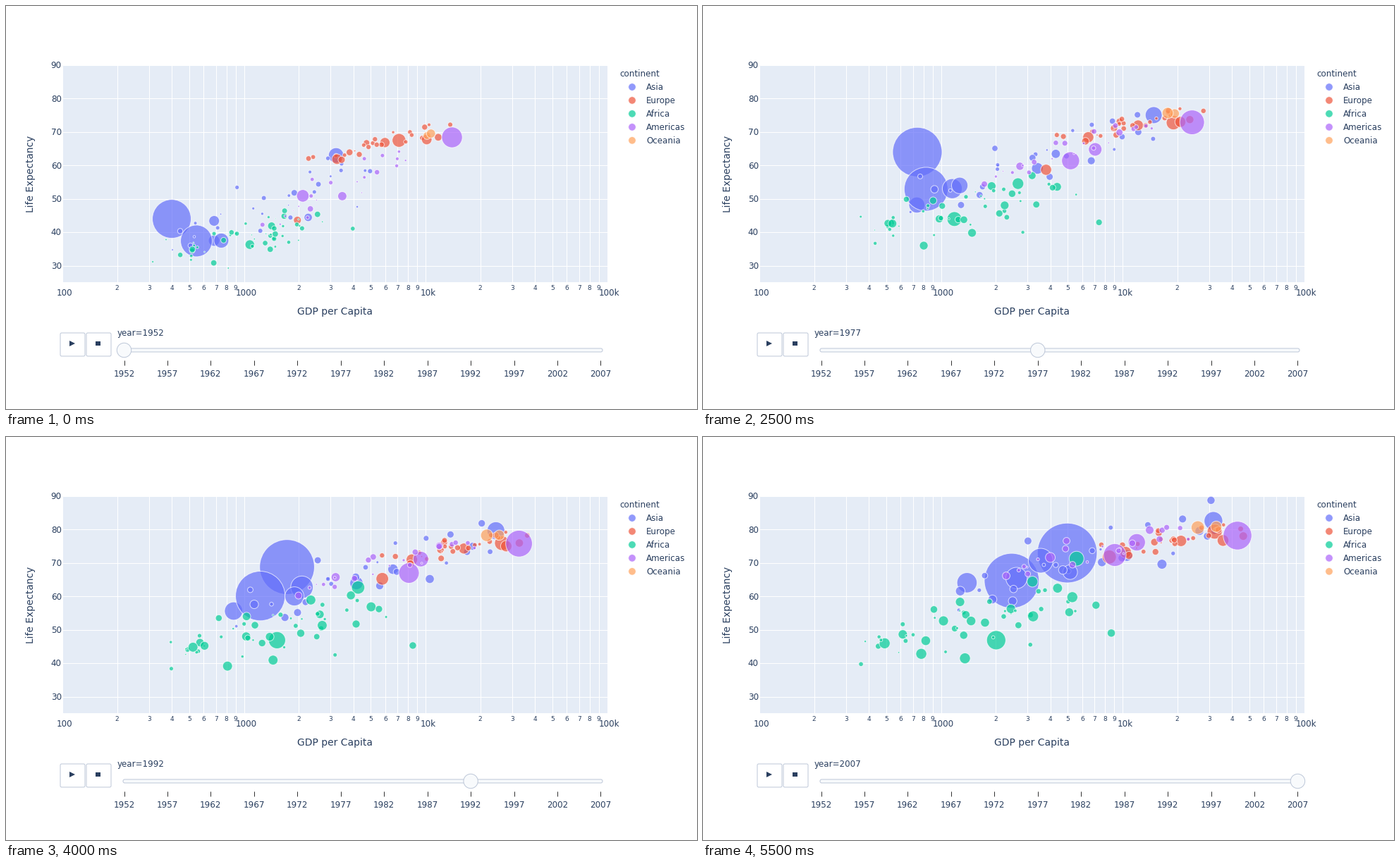
A matplotlib script that plays this animation: 980 by 572 pixels, repeating every 6000 ms.

```python
import numpy as np
import matplotlib.pyplot as plt
from matplotlib.animation import FuncAnimation
from matplotlib.patches import Circle, FancyBboxPatch, Polygon, Rectangle

W, H, DPI = 980, 572, 100
PT = 72 / DPI
STEPS = np.arange(12)
T = STEPS / 11
INK, BORDER, PALE = "#2a3f5f", "#bec8d9", "#f8fafc"
NAMES = ["Asia", "Europe", "Africa", "Americas", "Oceania"]
COLORS = ["#636efa", "#ef553b", "#00cc96", "#ab63fa", "#ffa15a"]
ASIA, EUROPE, AFRICA, AMERICAS, OCEANIA = range(5)
LEFT, RIGHT, TOP, BOTTOM = 80, 852.5, 84, 392

plt.rcParams["font.family"] = "DejaVu Sans"
rng = np.random.default_rng(11)
bubbles = []


def gdp_x(log_gdp):
    return LEFT + 257.5 * (log_gdp - 2)


def life_y(life):
    return TOP + 4.742 * (90 - life)


def add(group, log_gdp, life, pops):
    """Bubble area follows a population in millions that grows linearly."""
    radius = 1.166 * np.sqrt(pops[0] + (pops[1] - pops[0]) * T)
    bubbles.append((group, gdp_x(log_gdp), life_y(life), radius))


def giant(group, pops, *path, knots=(0, 3, 7, 11)):
    """Move a large bubble through a few (gdp, life) points."""
    gdp, life = zip(*path)
    add(group, np.interp(STEPS, knots, np.log10(gdp)), np.interp(STEPS, knots, life), pops)


def cloud(group, count, gdp0, gdp1, life0, life1, pop, growth, spread):
    """Scatter bubbles along a wealth-health trend that rises over the years.

    Ranges run from the poorest to the richest member, at the start and the end.
    """
    progress = T ** 0.75
    sway = np.sin(np.pi * T)
    for rank in (np.arange(count) + 0.5) / count:
        noise = rng.normal(0, spread, 6)
        g0, g1 = (np.interp(rank, (0, 1), np.log10(g)) for g in (gdp0, gdp1))
        l0, l1 = (np.interp(rank, (0, 1), life) for life in (life0, life1))
        log_gdp = g0 + noise[0] + (g1 - g0 + noise[1]) * progress + noise[2] / 2 * sway
        life = l0 + (l1 - l0) * progress + 20 * (noise[3] + noise[4] * T + noise[5] / 2 * sway)
        size = pop * np.exp(np.clip(rng.normal(), -2, 1.6))
        add(group, log_gdp, life, (size, size * growth))


giant(ASIA, (47, 150), (684, 37.5), (721, 43.5), (752, 52.8), (1391, 64.1))
giant(ASIA, (556, 1319), (400, 44), (488, 44.5), (613, 58.4), (741, 64), (2289, 70.4),
      (4959, 73), knots=(0, 2, 3, 5, 9, 11))
giant(ASIA, (372, 1110), (547, 37.4), (701, 47.2), (977, 58.6), (2452, 64.7))
giant(ASIA, (82, 224), (750, 37.5), (762, 46), (1748, 60.1), (3541, 70.7))
giant(ASIA, (86, 127), (3217, 63), (9848, 71.4), (22376, 78.7), (31656, 82.6))
giant(ASIA, (41, 169), (685, 43.4), (943, 49.8), (1705, 58.2), (2606, 65.5))
cloud(ASIA, 27, (480, 5500), (1150, 36000), (37, 61), (61, 81), 5, 3.2, 0.14)

giant(EUROPE, (69, 82), (7144, 67.5), (14746, 70.8), (24639, 74.8), (32170, 79.4))
giant(EUROPE, (22, 71), (1969, 43.6), (2826, 54.3), (5089, 63.1), (8458, 71.8))
cloud(EUROPE, 28, (2500, 11500), (9000, 38000), (61, 72), (74, 80.5), 8, 1.25, 0.05)

giant(AFRICA, (22, 80), (1419, 41.9), (1815, 49.3), (3885, 59.8), (5581, 71.3))
giant(AFRICA, (33, 135), (1077, 36.3), (1015, 41), (1385, 46.9), (2014, 46.9))
cloud(AFRICA, 50, (420, 2800), (430, 6500), (34, 44), (45, 60), 2.8, 3.1, 0.14)

giant(AMERICAS, (57, 190), (2109, 50.9), (3430, 57.6), (7807, 65.2), (9066, 72.4))
giant(AMERICAS, (30, 109), (3478, 50.8), (5755, 60.1), (8688, 69.5), (11978, 76.2))
giant(AMERICAS, (158, 301), (13990, 68.4), (19530, 70.8), (29884, 75), (42952, 78.2))
cloud(AMERICAS, 22, (1700, 7500), (3000, 20000), (42, 65), (67, 79), 3.5, 2.6, 0.08)

cloud(OCEANIA, 2, (10000, 10600), (36000, 23000), (69, 69.5), (81.5, 80), 6, 2.2, 0.005)

groups = [b[0] for b in bubbles]
xs, ys, rs = (np.array([b[i] for b in bubbles]) for i in (1, 2, 3))

fig = plt.figure(figsize=(W / DPI, H / DPI), dpi=DPI, facecolor="white")
ax = fig.add_axes([0, 0, 1, 1])
ax.set(xlim=(0, W), ylim=(H, 0))
ax.axis("off")


def label(x, y, text, size=11.85, ha="center"):
    """Place text with its capitals centred on y."""
    return ax.text(x, y + 0.365 * size, text, fontsize=size * PT, color=INK,
                   ha=ha, va="baseline")


def line(x, y, color, z):
    ax.plot(x, y, color=color, lw=PT, zorder=z, solid_capstyle="butt")


def rounded(x, y, w, h, radius, face):
    ax.add_patch(FancyBboxPatch((x, y), w, h, fc=face, ec=BORDER, lw=PT, zorder=3,
                                boxstyle=f"round,pad=0,rounding_size={radius}"))


def dots(x, y, r, colors):
    return ax.scatter(x, y, s=(2 * r * PT) ** 2, c=colors, alpha=0.7,
                      edgecolors="white", linewidths=PT, zorder=4)


plot_area = Rectangle((LEFT, TOP), RIGHT - LEFT, BOTTOM - TOP, fc="#e5ecf6", lw=0)
ax.add_patch(plot_area)

for power, text in zip(range(2, 6), ("100", "1000", "10k", "100k")):
    label(gdp_x(power) + 3.3, 407, text)
    for digit in range(1, 10 if power < 5 else 2):
        x = gdp_x(power + np.log10(digit))
        line([x, x], [TOP, BOTTOM], "white", 2)
        if digit > 1:
            label(x, 399.3, str(digit), 9)
for life in range(30, 91, 10):
    y = life_y(life)
    line([LEFT, RIGHT], [y, y], "white", 2)
    label(78.8, y, str(life), ha="right")
label(466.3, 433, "GDP per Capita", 13.9)
ax.text(35, 238.5, "Life Expectancy", fontsize=13.8 * PT, color=INK,
        rotation=90, ha="center", va="center")

label(870, 96, "continent", ha="left")
legend_y = 115 + 18.95 * np.arange(5)
dots(np.full(5, 888), legend_y, np.full(5, 5.3), COLORS)
for name, y in zip(NAMES, legend_y):
    label(908, y, name, ha="left")

rounded(77, 464, 35, 33, 2, "white")
rounded(114, 464, 35, 33, 2, "white")
ax.add_patch(Polygon([(90, 475), (98, 479), (90, 483)], fc=INK, lw=0, zorder=4))
ax.add_patch(Rectangle((127.3, 476.2), 6.2, 6.2, fc=INK, lw=0, zorder=4))

slider_x = 167.5 + 61.45 * STEPS
rounded(166, 486, 680, 5, 2.4, PALE)
for step, x in enumerate(slider_x):
    line([x, x], [503, 510], "#333333", 3)
    label(x, 522, str(1952 + 5 * step))
grip = ax.add_patch(Circle((slider_x[0], 488.5), 10.2, fc=PALE, ec=BORDER, lw=PT, zorder=5))
year_text = label(158, 464, "year=1952", ha="left")

marks = dots(xs[:, 0], ys[:, 0], rs[:, 0], [COLORS[g] for g in groups])
marks.set_clip_path(plot_area)


def update(step):
    marks.set_offsets(np.column_stack((xs[:, step], ys[:, step])))
    marks.set_sizes((2 * rs[:, step] * PT) ** 2)
    grip.center = slider_x[step], 488.5
    year_text.set_text(f"year={1952 + 5 * step}")
    return marks, grip, year_text


anim = FuncAnimation(fig, update, frames=12, interval=500, repeat=True, blit=False)
plt.show()
```
